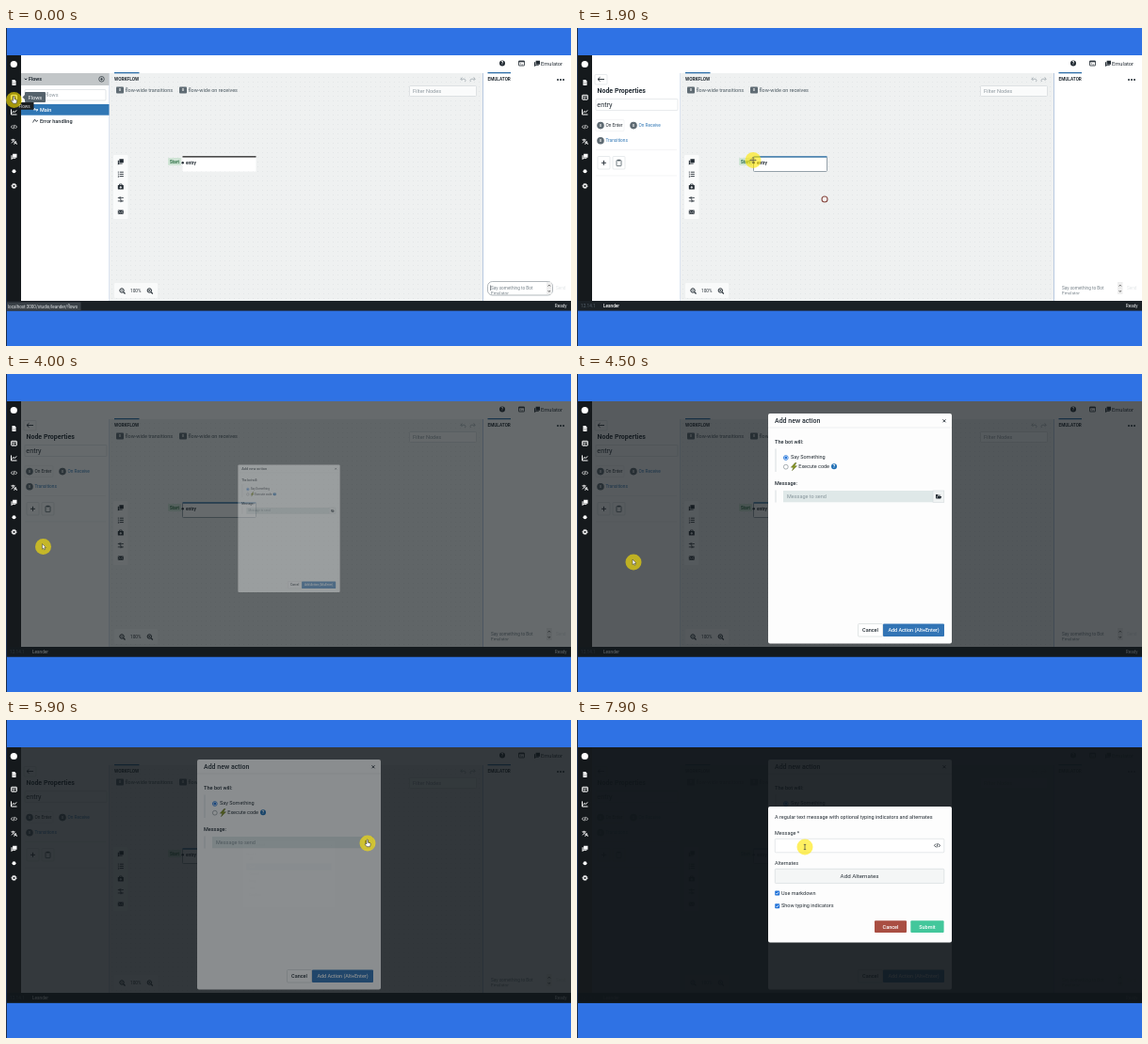
Animation of 600 by 338 pixels, one loop 8000 ms. Source, as an HTML page:

```html
<!DOCTYPE html>
<html lang="en">
<head>
<meta charset="utf-8">
<title>Adding a text message</title>
<style>
html, body { margin: 0; width: 100%; height: 100%; overflow: hidden; background: #2f72e4; }
svg { display: block; width: 100vw; height: 100vh; font-family: Roboto, Arial, sans-serif; }
text { white-space: pre; }
</style>
</head>
<body>
<svg id="stage" viewBox="0 0 600 338"></svg>
<script>
const INK = '#222b33', BLUE = '#3077b5', LINE = '#d9dee1';

// Drawing helpers; text is centred vertically on y.
const text = (x, y, s, size = 5.5, fill = INK, weight = 400, anchor = 'start') =>
  `<text x="${x}" y="${y + size * .355}" font-size="${size}" fill="${fill}" font-weight="${weight}" text-anchor="${anchor}">${s}</text>`;
const rect = (x, y, w, h, fill, stroke = 'none', r = 0, sw = .6) =>
  `<rect x="${x}" y="${y}" width="${w}" height="${h}" rx="${r}" fill="${fill}" stroke="${stroke}" stroke-width="${sw}"/>`;
const circle = (x, y, r, fill, stroke = 'none', sw = .8) =>
  `<circle cx="${x}" cy="${y}" r="${r}" fill="${fill}" stroke="${stroke}" stroke-width="${sw}"/>`;
const line = (d, stroke = LINE, sw = .6) =>
  `<path d="${d}" fill="none" stroke="${stroke}" stroke-width="${sw}"/>`;
const group = (id, body) => `<g id="${id}">${body}</g>`;

// Icons fit a box of about 6 by 6 around their centre.
const shapes = {
  doc: c => `<path d="M-2 -3H.7L2 -1.6V3H-2Z" fill="${c}"/>` + line('M-1 0H1M-1 1.4H1', '#555', .5),
  flow: c => rect(-2.8, -2.4, 5.6, 4.8, 'none', c, .3, 1) + line('M-2.8 -.6H2.8M-.5 -.6V2.4', c, .7),
  chart: c => line('M-3 -3V2.6H3M-2 1L-.5 -1L.7 .2L2.7 -2', c, 1),
  code: c => line('M-1.4 -1.8L-3 0L-1.4 1.8M1.4 -1.8L3 0L1.4 1.8M.5 -2.2L-.5 2.2', c, .8),
  lang: c => line('M-3 -2H1M-1 -3V-2M.3 -2Q-.5 .4 -2.8 1.4M-2.2 -2Q-1.3 -.2 .2 .7M.1 3L1.6 -.6L3.1 3M.7 1.8H2.5', c, .8),
  chat: c => `<path d="M-1.4 -2.8H3V1.2H-1.4ZM-3 -1.2H-1.9V1.8H1.8V2.4H-1.3L-3 3.4Z" fill="${c}"/>`,
  gear: c => circle(0, 0, 1.7, 'none', c, 1.3) + `<circle r="2.6" fill="none" stroke="${c}" stroke-width="1" stroke-dasharray="1 1.04"/>`,
  list: c => line('M-1 -2.2H3M-1 0H3M-1 2.2H3', c, .9) + line('M-2.5 -3V-1.3M-3 -.4H-2V.5M-3 1.6H-2V3H-3', c, .6),
  kit: c => rect(-3, -1.8, 6, 4.5, c, 'none', .5) + line('M-1.3 -1.8V-2.8H1.3V-1.8', c, .8) + line('M-1.3 .5H1.3M0 -.8V1.8', '#fff', .8),
  swap: c => line('M-3 -1.7H-.6M-3 1.7H-.6M.6 -1.7H3M.6 1.7H3M-1.5 -2.7L-.5 -1.7L-1.5 -.7M1.5 .7L.5 1.7L1.5 2.7M0 -3V3', c, .8),
  mail: c => rect(-3, -2.2, 6, 4.4, c, 'none', .4) + line('M-3 -1.8L0 .7L3 -1.8M-3 1.8L-1 0M3 1.8L1 0', '#fff', .5),
  term: c => rect(-3, -2.5, 6, 5, 'none', c, .3, .8) + line('M-3 -1.8H3', c, 1.2) + line('M-1.8 -.4L-.8 .5L-1.8 1.4M0 1.4H1.6', c, .6),
  help: c => circle(0, 0, 3, c) + text(0, 0, '?', 5, '#fff', 700, 'middle'),
  folder: c => `<path d="M-3 2.2V-2.2H-1L-.3 -1.5H2V-.6H-1.3L-2.4 2.2ZM-1 -.1H3.2L2.2 2.4H-2Z" fill="${c}"/>`,
  clip: c => rect(-2.5, -2.7, 5, 6, 'none', c, .4, .8) + rect(-1.3, -3.5, 2.6, 1.6, c),
  zoom: c => circle(-.5, -.5, 2.2, 'none', c, 1) + line('M1.1 1.1L3 3', c, 1.2) + line('M-1.6 -.5H.6', c, .7),
  cross: c => line('M-1.5 -1.5L1.5 1.5M1.5 -1.5L-1.5 1.5', c, .9),
  plus: c => line('M-2.5 0H2.5M0 -2.5V2.5', c, .9)
};
const icon = (name, x, y, c = INK) => `<g transform="translate(${x} ${y})">${shapes[name](c)}</g>`;

const badge = (x, y, s, fill = INK, size = 4.75, r = 3.8, square = false) =>
  (square ? rect(x - 4, y - 3.6, 8, 7.2, '#5f6b73', 'none', 1) : circle(x, y, r, '#5f6b73')) +
  text(x, y, '0', 4.2, '#fff', 500, 'middle') + text(x + 5.4, y, s, size, fill);

const header = rect(16, 29, 584, 19, '#fff') +
  icon('help', 527, 37.5) + icon('term', 547.5, 37.5) + icon('chat', 564, 37.5) + text(568, 37.5, 'Emulator', 5.75);

const diagram = rect(109.5, 48, 397, 242, '#eff1f1') + rect(109.5, 48, 397, 242, 'url(#dots)') +
  line('M109.5 48V290M506.5 48V290', '#d4d8da') +
  rect(115, 47, 26.5, 1.3, '#2d6ea8') + text(115, 54.5, 'WORKFLOW', 4.8, INK, 700) +
  badge(121, 66, 'flow-wide transitions', '#4b5860', 5.5, 0, true) +
  badge(188, 66, 'flow-wide on receives', '#4b5860', 5.5, 0, true) +
  line('M484.5 52.5L482.7 54.2L484.5 56M483 54.2H487Q489 55 487.5 57M496.500 52.5L498.300 54.2L496.500 56M498 54.2H494Q492 55 493.5 57', '#a4acb1', .8) +
  rect(428.500, 61.5, 71, 11, '#fafbfb', '#cfd4d7', 1) + text(432, 67, 'Filter Nodes', 5.6, '#8d979e') +
  rect(114, 135, 15.500, 68, '#fafbfb', 'none', 1) +
  ['chat', 'list', 'kit', 'swap', 'mail'].map((n, i) => icon(n, 121.8, 142 + i * 13.4)).join('') +
  rect(115, 271, 46, 16, '#f9fafa', 'none', 1) + icon('zoom', 123.5, 279.5) +
  text(132, 279.3, '100%', 4.7) + icon('zoom', 152.8, 279.5) + line('M152.3 277.9V280.1', INK, .7);

const node = rect(172, 138, 14, 8, '#cfe4d5', 'none', 1) + text(174, 142, 'Start', 4.5, '#286b3f', 700) +
  rect(187.500, 137, 78, 15.5, '#fff') +
  group('plainNode', rect(187.5, 136.2, 78, 1.3, '#222')) +
  group('pickedNode', rect(187.5, 137, 78, 15.5, 'none', '#7b8b96', 1, .8) + rect(187.5, 136.2, 78, 1.4, '#3a7cae')) +
  circle(187.7, 143.3, 1.2, INK) + text(191, 143.4, 'entry', 4.75, INK, 700);

const emulator = rect(507, 48, 93, 242, '#fff') + rect(511.5, 47, 24.5, 1.3, '#2d6ea8') +
  text(511.5, 54.5, 'EMULATOR', 4.7, INK, 700) + [586, 589, 592].map(x => circle(x, 55, 1, INK)).join('') +
  group('focusBox', rect(511.5, 269.5, 69, 14.5, '#fff', '#7c878e', 5) + line('M514.6 273.5V279', INK, .6)) +
  text(515, 276.5, 'Say something to Bot', 4.7, '#77828a') +
  `<g clip-path="url(#inputClip)">${text(515, 282.2, 'Emulator', 4.7, '#77828a')}</g>` +
  rect(574, 270, 5.5, 13, '#eee') + line('M575.6 274.5L576.8 273L578 274.5M575.6 279L576.8 280.5L578 279', '#555', .8) +
  text(584, 276.5, 'Send', 4.7, '#e2e6e8');

const flows = rect(16, 48, 93.5, 242, '#fff') + rect(16, 48, 93.5, 13, '#c2c6c8') +
  line('M19.8 53.6L21 55L22.200 53.6', INK, 1) + text(24, 54.5, 'Flows', 5.3, INK, 700) +
  circle(101.5, 54.3, 2.8, 'none', INK, .7) + line('M100 54.3H103M101.5 52.8V55.8', INK, .7) +
  rect(20, 65.5, 86, 11.5, '#fff', '#cfd4d7', 1) + text(24, 71.2, 'Search flows', 5.5, '#8d979e') +
  rect(16, 81, 93.5, 11.7, BLUE) + line('M29 86.8H34M29 86.8L31 85.300M34 86.8L32 88.300', '#fff', .9) + text(36, 86.8, 'Main', 5.5, '#fff', 500) +
  line('M28.5 100.5L30.5 97L32 99.5L34 98', INK, .8) + text(36, 98.6, 'Error handling', 5.5, INK, 500);

const properties = rect(16, 48, 93.5, 242, '#fff') + rect(19, 49.500, 13, 10.5, '#fff', LINE, 1) +
  line('M24.5 52.3L22 54.5L24.5 56.700M22 54.5H29', INK, .9) + text(21.5, 66.5, 'Node Properties', 7, INK, 700) +
  rect(20, 75.5, 87, 12, '#fff', LINE, 1) + text(21.3, 81.5, 'entry', 7.3) +
  rect(20, 97.5, 30, 12, '#fff', '#eceff0', 1) + badge(25, 103.600, 'On Enter') +
  badge(60, 103.6, 'On Receive', BLUE) + group('transitions', badge(25, 119.7, 'Transitions', BLUE)) +
  line('M20 129.5H106M20 157H106', '#eceff0') +
  rect(22, 136.5, 13, 13.5, '#fff', LINE, 1) + icon('plus', 28.5, 143.3) +
  rect(38, 136.5, 13, 13.5, '#fff', LINE, 1) + icon('clip', 44.5, 143.3, '#4b5860');

const status = rect(0, 290, 600, 10.6, '#1b2126') + text(4, 295.5, '12.14.1', 4.7, '#56616a') +
  text(28, 295.5, 'Leander', 4.7, '#fff', 500) + text(582.8, 295.5, 'Ready', 4.7, '#e8ebed');

const sidebar = rect(0, 29, 16, 261, '#15191c') + circle(8.3, 38.5, 3.6, '#fff') +
  ['doc', 'flow', 'chart', 'code', 'lang', 'chat', '', 'gear'].map((n, i) =>
    n ? icon(n, 8.5, 58 + i * 15.7, '#fff') : circle(8.5, 152.2, 2, '#fff')).join('');

const links = group('flowsLink', rect(0, 291.5, 79.5, 9, '#3a4147') + text(2, 296, 'localhost:3000/studio/leander/flows', 4.55, '#e2e5e7')) +
  group('hashLink', rect(0, 291.5, 38, 9, '#3a4147') + text(2, 296, 'localhost:3000/#', 4.55, '#e2e5e7'));

const tips = group('tips', rect(20, 68, 22, 11, '#55626b', 'none', 1) + `<path d="M20 71L17.5 73.5L20 76Z" fill="#55626b"/>` +
  text(23.5, 73.6, 'Flows', 5.6, '#fff') + rect(11, 79, 18.5, 7.8, '#1b1f22') + text(13.5, 82.9, 'Flows', 4.6, '#ddd'));

// Dialogs
const panel = (y, h) => rect(203, y, 195, h, '#fdfdfd', 'none', 2);
const title = (y, s) => text(210, y, s, 7, INK, 500) + icon('cross', 390, y + .3) + line(`M203 ${y + 7.5}H398`, '#e2e6e8');
const button = (x, y, w, h, s, fill, ink, stroke = 'none', size = 5.5) =>
  rect(x, y, w, h, fill, stroke, 1) + text(x + w / 2, y + h / 2, s, size, ink, 500, 'middle');
const check = y => rect(210.200, y - 2.5, 5, 5, '#2374d9', 'none', .8) + line(`M211.4 ${y}L212.4 ${y + 1.1}L214.2 ${y - 1.2}`, '#fff', .8);

const actionDialog = panel(42, 244.5) + title(49.5, 'Add new action') +
  text(210, 72.3, 'The bot will:', 5.6, INK, 500) + line('M211 79.500V104M211 123.5V136.5', '#cfd5d8', .8) +
  circle(221.8, 89, 2.4, '#fff', '#2374d9', .8) + circle(221.8, 89, 1.4, '#2374d9') + text(227, 88.5, 'Say Something') +
  circle(221.8, 98.7, 2.4, '#fff', '#858d92', .7) +
  '<path d="M231.500 94.5L227.3 99.200H229.8L228.500 102.7L233.5 97.700H230.800L233 94.5Z" fill="#8a9a1e" stroke="#46501a" stroke-width=".4"/>' +
  text(235.3, 98.5, 'Execute code') + icon('help', 273, 98.3, '#1f6fb5') +
  text(210, 116, 'Message:', 5.5, INK, 500) +
  rect(219, 124, 159, 12.3, '#dfe8e8') + text(223, 130.2, 'Message to send', 5.5, '#87959b') +
  rect(378, 124, 11.8, 12.3, '#f0f3f3', '#d3d9dc') + icon('folder', 384, 130.2) +
  button(298.5, 265.5, 26, 13.5, 'Cancel', '#fff', INK, '#cdd3d6') +
  button(325, 265.5, 65, 13.5, 'Add Action (Alt+Enter)', '#3274b5', '#fff', 'none', 5.4);

const pickDialog = panel(94.5, 140) + title(102.3, 'Pick Content') + text(210, 121.5, 'Search In', 5.2, INK, 500) +
  rect(210, 125, 180, 90.5, '#fff', LINE) + group('hoverRow', rect(210, 185.5, 180, 15, '#efefef')) +
  rect(210, 140.2, 180, 15, BLUE) +
  ['All', 'Card', 'Carousel', 'Image', 'Text', 'Dropdown'].map((s, i) =>
    text(216.5, 132.7 + i * 15.1, s, 5.5, i == 1 ? '#fff' : '#5a646b', i == 1 ? 500 : 400) +
    (i ? line(`M210 ${125.1 + i * 15.1}h180`, '#e4e8ea', .5) : '')).join('');

const textDialog = panel(92, 144.5) + text(210, 102.6, 'A regular text message with optional typing indicators and alternates') +
  text(210, 120.3, 'Message *') + rect(210.3, 126.3, 179.5, 14.5, '#fff', '#d2d7da', 1) + icon('code', 382.5, 133.3) +
  text(210, 152.5, 'Alternates') + button(210.3, 158.3, 179.5, 15.3, '', '#f4f6f6', INK, '#cfd5d8') +
  text(300, 166, 'Add Alternates', 6.2, INK, 400, 'middle') +
  check(184) + text(217, 183.7, 'Use markdown') + check(197.8) + text(217, 197.3, 'Show typing indicators') +
  button(316, 213.3, 34, 12.700, 'Cancel', '#a94e42', '#fff') + button(354.3, 213.3, 35.3, 12.7, 'Submit', '#43c79b', '#fff');

const dialogs = [
  { body: actionDialog, start: 3950 },
  { body: pickDialog, start: 5900 },
  { body: textDialog, start: 7220 }
];
const layers = dialogs.map((d, i) =>
  group('shade' + i, rect(0, 29, 600, 271.6, '#10161a')) + group('dialog' + i, d.body)).join('');

const pointers = {
  hand: '<path d="M-1 -3.6Q-.2 -4.3 .5 -3.500V-.8L2.8 -.1Q3.4 .2 3.200 1L2.600 3.700H-.8L-3 1Q-2.8 -.2 -1 .8Z" fill="#fff" stroke="#333" stroke-width=".6"/>',
  arrow: '<path d="M-1 -3V2.700L.3 1.5L1.2 3.4L2.100 3L1.200 1.1H2.900Z" fill="#fff" stroke="#333" stroke-width=".5"/>',
  move: line('M-3 0H3M0 -3V3M-2 -1L-3 0L-2 1M2 -1L3 0L2 1M-1 -2L0 -3L1 -2M-1 2L0 3L1 2', '#555', .7),
  barred: circle(0, 0, 2.2, 'none', '#b23a2a', 1) + line('M-1.5 -1.5L1.5 1.5', '#b23a2a', .9),
  beam: line('M-1.2 -2.600H1.2M-1.2 2.6H1.2M0 -2.6V2.6', '#444', .7)
};

const stage = document.getElementById('stage');
stage.innerHTML = `<defs>
  <pattern id="dots" width="5" height="5" patternUnits="userSpaceOnUse"><circle cx="2.5" cy="2.5" r=".45" fill="#d5d9db"/></pattern>
  <clipPath id="inputClip"><rect x="512" y="270" width="62" height="13.3"/></clipPath></defs>` +
  rect(0, 0, 600, 338, '#2f72e4') + header + diagram + node + emulator +
  group('flows', flows) + group('properties', properties) + group('ring', circle(263, 182, 3, '#f7f3f2', '#874840', 1.1)) +
  status + layers + sidebar + links + tips + rect(0, 0, 1, 338, '#1b2d4d') +
  group('cursor', circle(0, 0, 8.5, '#ffe600').replace('/>', ' opacity=".62"/>') +
    Object.entries(pointers).map(([k, v]) => group(k, v)).join(''));

const $ = id => document.getElementById(id);
const show = (id, on) => $(id).style.display = on ? '' : 'none';
const clamp = v => Math.max(0, Math.min(1, v));
const ease = v => v * v * (3 - 2 * v);

// time, x, y
const path = [
  [0, 8.5, 76.500], [400, 8.5, 76.5], [1000, 215, 146], [1300, 215, 146], [1650, 263, 182], [1900, 187, 140.500],
  [2550, 60, 105], [3000, 37, 115.5], [3450, 29, 143], [3800, 29, 143], [4000, 39.500, 183.5], [4500, 60, 200],
  [5050, 300, 140], [5400, 377, 132], [5650, 384, 131], [5900, 384, 131], [6300, 300, 190], [6700, 305, 243],
  [7000, 250, 194], [7200, 250, 194], [7750, 242, 135], [8000, 242, 135]
];

function cursorAt(t) {
  const i = path.findIndex(p => p[0] > t), [a, b] = [path[i - 1], path[i]];
  const k = ease((t - a[0]) / (b[0] - a[0]));
  return [a[1] + (b[1] - a[1]) * k, a[2] + (b[2] - a[2]) * k];
}

function pointerAt(t) {
  if (t < 500) return 'hand';
  if (t < 800) return 'arrow';
  if (t < 2200) return 'move';
  if (t < 3850) return 'hand';
  if (t < 5150) return 'arrow';
  if (t < 5550) return 'barred';
  return t < 7600 ? 'hand' : 'beam';
}

function draw(t) {
  const edit = t >= 1200;
  show('flows', !edit);
  show('properties', edit);
  show('plainNode', !edit);
  show('pickedNode', edit);
  show('focusBox', t < 1100);
  show('tips', t < 500);
  show('flowsLink', t < 500);
  show('hashLink', t >= 2400 && t < 3300);
  show('ring', t >= 1700 && t < 2000);
  show('hoverRow', t >= 6400);
  $('transitions').style.opacity = t >= 2850 && t < 3250 ? .6 : 1;

  dialogs.forEach(({ start }, i) => {
    const p = clamp((t - start) / 300), open = 1 - (1 - p) ** 2;
    const scale = t - start < 60 ? .5 + .055 * clamp((t - start) / 50) : .5 + .5 * open;
    $('shade' + i).style.opacity = .7 * clamp((t - start + 150) / 220);
    show('dialog' + i, p > 0);
    $('dialog' + i).style.opacity = clamp(p * 2.2);
    $('dialog' + i).setAttribute('transform', `translate(300.5 164.3) scale(${scale}) translate(-300.5 -164.3)`);
  });

  const [x, y] = cursorAt(t), now = pointerAt(t);
  $('cursor').setAttribute('transform', `translate(${x} ${y})`);
  Object.keys(pointers).forEach(k => show(k, k == now));
}

const begin = performance.now();
function tick() {
  draw((performance.now() - begin) % 8000);
  requestAnimationFrame(tick);
}
tick();
</script>
</body>
</html>
```
